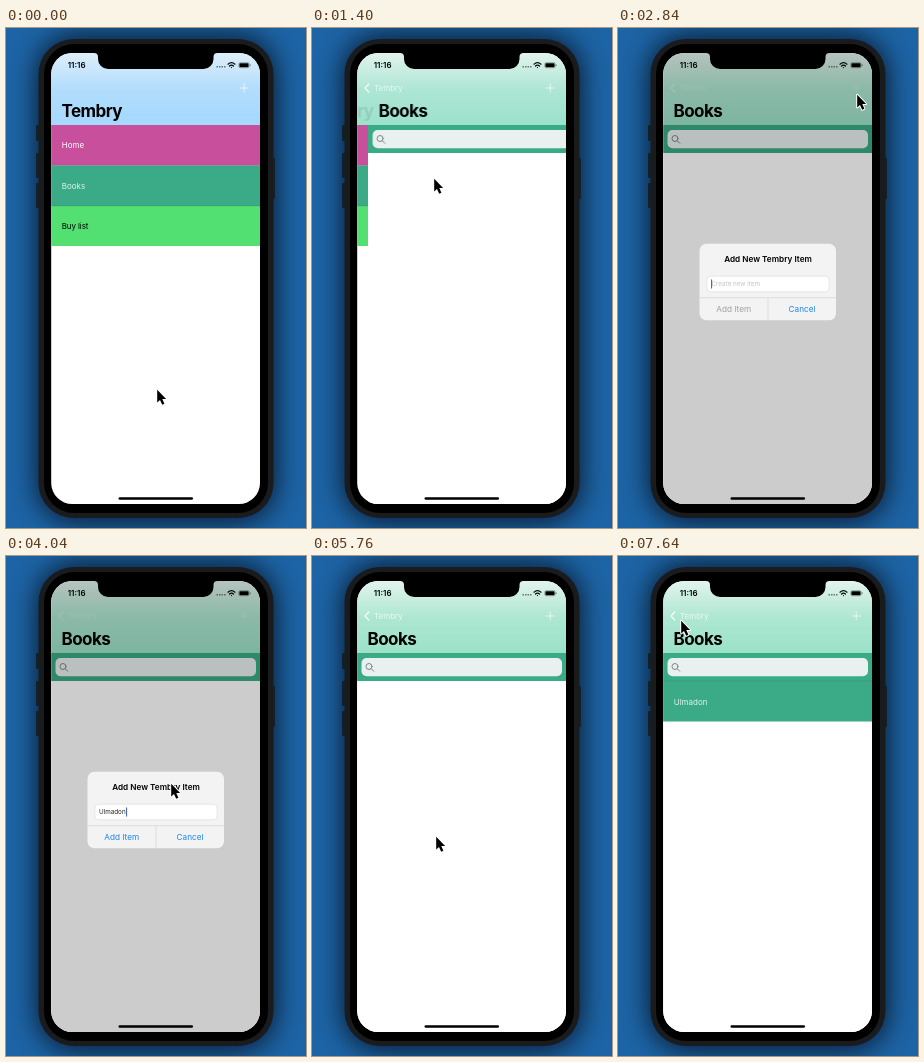
These frames come from a looping animation (300x500 px, 8 s). An HTML page:

```html
<!DOCTYPE html>
<html lang="en">
<head>
<meta charset="utf-8">
<title>To-do list</title>
<style>
html, body { margin: 0; width: 100%; height: 100%; overflow: hidden; background: #1c61a2; }
svg { display: block; width: 300px; height: 500px; font: 8px Inter, "Open Sans", sans-serif; }
.title { font-size: 17px; font-weight: 700; letter-spacing: -.55px; }
.bold { font-weight: 600; }
.small { font-size: 6.3px; }
.mid { text-anchor: middle; font-size: 8.2px; }
.line { fill: none; stroke-linecap: round; stroke-linejoin: round; }
.anim, .anim-step { animation: 8s infinite both; }
.anim-step { animation-timing-function: step-end; }

/* screen change */
.page-in { animation-name: pageIn; }
.page-out { animation-name: pageOut; }
.fade-in { animation-name: fadeIn; }
@keyframes pageIn {
  0%, 14.5% { transform: translateX(209px); animation-timing-function: cubic-bezier(.2,.8,.2,1); }
  20.5%, 100% { transform: none; }
}
@keyframes pageOut {
  0%, 14.5% { transform: none; animation-timing-function: cubic-bezier(.2,.8,.2,1); }
  20.5%, 100% { transform: translateX(-63px); }
}
.title-out { animation-name: titleOut; }
@keyframes titleOut {
  0%, 14.5% { transform: none; opacity: 1; animation-timing-function: ease-out; }
  18.5%, 100% { transform: translateX(-60px); opacity: 0; }
}
@keyframes fadeIn {
  0%, 14.5% { opacity: 0; }
  19%, 100% { opacity: 1; }
}

/* dialog */
.dim { animation-name: dim; }
@keyframes dim {
  0%, 29.5% { opacity: 0; }
  33.5%, 67.5% { opacity: .2; }
  71.5%, 100% { opacity: 0; }
}
.tint { animation-name: tint; }
@keyframes tint {
  0%, 29.5% { opacity: 1; }
  33.5%, 67.5% { opacity: .35; }
  71.5%, 100% { opacity: 1; }
}
.alert { transform-origin: 150px 254px; animation-name: alert; }
@keyframes alert {
  0%, 29.5% { opacity: 0; transform: scale(1.17); animation-timing-function: cubic-bezier(.2,.8,.2,1); }
  34.5%, 67.5% { opacity: 1; transform: none; }
  71.5%, 100% { opacity: 0; transform: none; }
}
.empty { animation-name: empty; }
@keyframes empty { 0% { opacity: 1; } 50.5%, 100% { opacity: 0; } }
.typed { animation-name: typed; }
@keyframes typed { 0% { opacity: 0; } 50.5%, 100% { opacity: 1; } }
.action { animation-name: action; }
@keyframes action { 0% { fill: #a0a0a2; } 50.5%, 100% { fill: #1c86e8; } }
.caret-x { animation-name: caretX; }
@keyframes caretX { 0% { transform: none; } 50.5%, 100% { transform: translateX(27px); } }
.caret { animation-name: blink; }
@keyframes blink {
  0%, 41.25% { opacity: 1; }
  42.5%, 45.25% { opacity: 0; }
  46.5%, 57% { opacity: 1; }
  58%, 61% { opacity: 0; }
  62%, 100% { opacity: 1; }
}
.item { animation-name: item; }
@keyframes item { 0% { opacity: 0; } 72.5%, 100% { opacity: 1; } }

.pointer { animation-name: pointer; animation-timing-function: ease-in-out; }
@keyframes pointer {
  0%, .5% { transform: translate(151px, 361px); }
  6%, 8.5% { transform: translate(141px, 300px); }
  13.5%, 19.5% { transform: translate(122px, 150px); }
  24.5% { transform: translate(239px, 71px); }
  26%, 35.5% { transform: translate(239px, 66px); }
  39.5%, 57% { transform: translate(165px, 227px); }
  63.5%, 73% { transform: translate(124px, 280px); }
  79%, 88.5% { transform: translate(131px, 148px); }
  95.5%, 100% { transform: translate(63px, 64px); }
}
</style>
</head>
<body>
<svg viewBox="0 0 300 500">
  <defs>
    <linearGradient id="blue" x2="0" y2="1">
      <stop stop-color="#deeffa"/><stop offset=".5" stop-color="#b2ddfc"/><stop offset="1" stop-color="#a4d8fe"/>
    </linearGradient>
    <linearGradient id="mint" x2="0" y2="1">
      <stop stop-color="#e2f4ed"/><stop offset=".5" stop-color="#aee7d2"/><stop offset="1" stop-color="#9be2c8"/>
    </linearGradient>
    <clipPath id="screen"><rect x="45.2" y="25" width="208.8" height="451" rx="21"/></clipPath>
    <filter id="blur" x="-30%" y="-30%" width="160%" height="160%"><feGaussianBlur stdDeviation="14"/></filter>
  </defs>

  <rect width="300" height="500" fill="#1d64a6"/>
  <rect x="32" y="9" width="236.5" height="484" rx="36" fill="#00060c" opacity=".8" filter="url(#blur)"/>

  <!-- phone body -->
  <g fill="#10202f">
    <rect x="30" y="97" width="6" height="16" rx="1"/>
    <rect x="30" y="125" width="6" height="25" rx="1"/>
    <rect x="30" y="155" width="6" height="25" rx="1"/>
    <rect x="264" y="130" width="5" height="41" rx="1"/>
  </g>
  <rect x="32.5" y="11" width="235" height="479" rx="35" fill="#1a1b1d"/>
  <rect x="38" y="16" width="224" height="469" rx="30" fill="#000"/>

  <g clip-path="url(#screen)">
    <rect x="45" y="25" width="210" height="452" fill="#fff"/>

    <!-- category list -->
    <g class="anim page-out">
      <rect x="45" y="97" width="210" height="40.5" fill="#c74f9c"/>
      <rect x="45" y="137.5" width="210" height="40.5" fill="#3aab86"/>
      <rect x="45" y="178" width="210" height="40" fill="#52e072"/>
      <path d="M45 137.5H255M45 178H255" stroke="#000" stroke-opacity=".16" stroke-width=".6"/>
      <g fill="#fff">
        <text x="55.7" y="120.3">Home</text>
        <text x="55.7" y="160.6" fill-opacity=".85">Books</text>
      </g>
      <text x="55.7" y="201" letter-spacing="-.1">Buy list</text>
    </g>

    <!-- item list -->
    <g class="anim page-in">
      <rect x="45" y="97" width="210" height="380" fill="#fff"/>
      <rect x="45" y="97" width="210" height="28" fill="#3aab86"/>
      <rect x="49.5" y="102" width="200.5" height="18.3" rx="5" fill="#e8f0f0"/>
      <g class="line" stroke="#808687" stroke-width="1">
        <circle cx="57" cy="110.5" r="3"/><path d="M59.3 112.8L61.8 115.3"/>
      </g>
      <g class="anim-step item">
        <rect x="45" y="125" width="210" height="40.5" fill="#3aab86"/>
        <path d="M45 125H255" stroke="#000" stroke-opacity=".13" stroke-width=".6"/>
        <text x="55.7" y="148.6" fill="#fff" fill-opacity=".85">Ulmadon</text>
      </g>
    </g>

    <!-- navigation bar -->
    <rect x="45" y="25" width="210" height="72" fill="url(#blue)"/>
    <rect class="anim fade-in" x="45" y="25" width="210" height="72" fill="url(#mint)"/>
    <text class="anim title title-out" x="55.5" y="89.2">Tembry</text>
    <text class="anim title page-in" x="55.5" y="89.2">Books</text>
    <g class="anim tint">
      <path class="line" d="M234 60H242.4M238.2 55.8V64.2" stroke="#fff" stroke-opacity=".65"/>
      <g class="anim fade-in">
        <path class="line" d="M56.8 56L53 60L56.8 64" stroke="#fff" stroke-opacity=".9" stroke-width="1.2"/>
        <text x="62" y="63" fill="#fff" fill-opacity=".75">Tembry</text>
      </g>
    </g>

    <rect class="anim dim" x="45" y="25" width="210" height="452"/>

    <!-- status bar -->
    <text class="bold" x="61.7" y="39.9">11:16</text>
    <path d="M210.5 38.7H219.5" stroke="#333" stroke-opacity=".65" stroke-width="1.4" stroke-dasharray="1.5 1"/>
    <g class="line" stroke="#000" stroke-width="1.2">
      <path d="M222 36.2Q225.5 33.2 229 36.2M223.5 38Q225.5 36.2 227.5 38"/>
      <path d="M225.5 39.5V39.6"/>
    </g>
    <rect x="232.7" y="34.6" width="10.6" height="5.2" rx="1.5" fill="none" stroke="#000" stroke-opacity=".45" stroke-width=".6"/>
    <rect x="233.4" y="35.2" width="9.2" height="4" rx=".9"/>
    <rect x="243.9" y="36.3" width=".8" height="1.8" rx=".4" opacity=".5"/>

    <path d="M88 24V25A4 4 0 0 1 92 29V31A10 10 0 0 0 102 41H197.5A10 10 0 0 0 207.5 31V29A4 4 0 0 1 211.5 25V24Z"/>
    <rect x="112.5" y="469.3" width="74.5" height="2.5" rx="1.25"/>

    <!-- dialog -->
    <g class="anim alert">
      <rect x="81.5" y="215.8" width="136.5" height="76.5" rx="7" fill="#f3f3f3"/>
      <text class="mid bold" x="150" y="233.8">Add New Tembry Item</text>
      <rect x="89" y="248.2" width="122" height="15.6" rx="3.5" fill="#fff" stroke="#d5d5d6" stroke-width=".5"/>
      <path d="M81.5 269.7H218M150 269.7V292.3" stroke="#d0d0d2" stroke-width=".6"/>
      <text class="anim-step small empty" x="93.5" y="258.3" fill="#c3c3c5">Create new item</text>
      <text class="anim-step small typed" x="93" y="258.3" fill="#222">Ulmadon</text>
      <g class="anim-step caret-x">
        <rect class="anim caret" x="93.1" y="251.5" width="1" height="9" fill="#345fa8"/>
      </g>
      <text class="anim-step mid action" x="115.7" y="284">Add Item</text>
      <text class="mid" x="184" y="284" fill="#1c86e8">Cancel</text>
    </g>
  </g>

  <path class="anim pointer" d="M.2 .8V13.6L3 11L5.2 15.8L7.4 14.8L5.3 10.1H9.1Z" stroke="#fff" stroke-width="2" stroke-linejoin="round" paint-order="stroke"/>
</svg>
</body>
</html>
```
